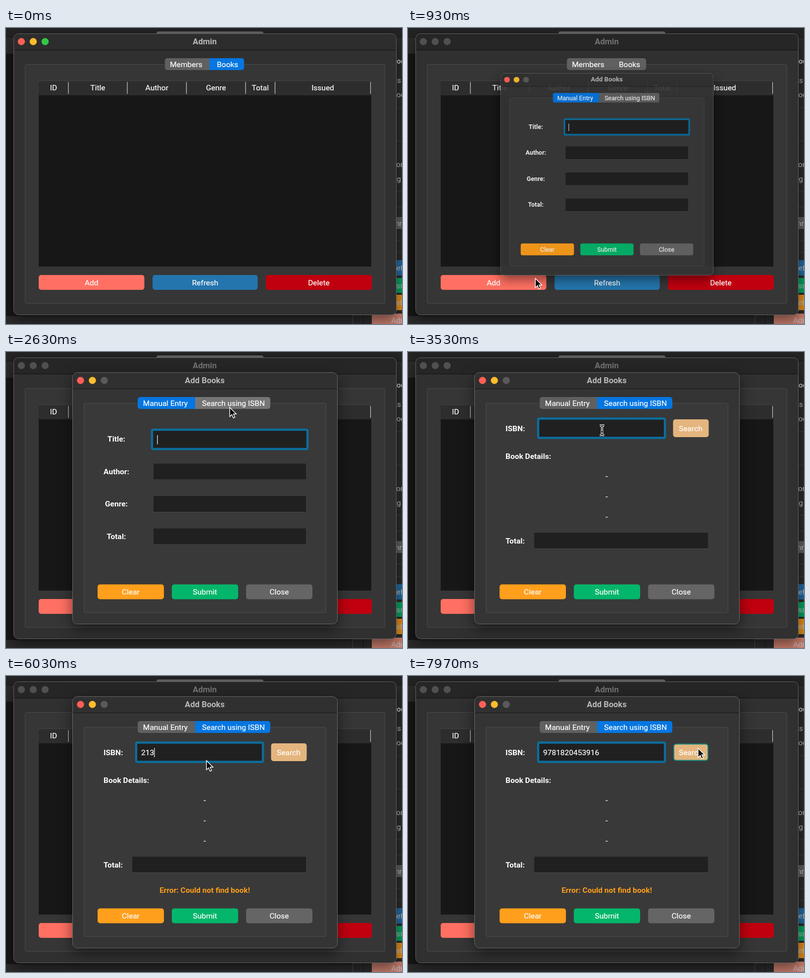
Recreate the animation shown at these times as an HTML page. Size 800 px wide and 598 px high, loop 8 s.

```html
<!DOCTYPE html>
<html lang="en">
<head>
<meta charset="utf-8">
<title>Library admin</title>
<style>
  html, body { margin: 0; width: 100%; height: 100%; overflow: hidden; background: #252525; }
  svg { display: block; width: 100vw; height: 100vh; }
  text { font: 400 15.5px Roboto, sans-serif; fill: #fff; stroke: #fff; stroke-width: .2px; white-space: pre; }
  .b { font-weight: 700; stroke: none; }
  .title { font-weight: 700; font-size: 16.5px; fill: #b8b8b8; stroke: none; }
  .side { fill: #bdbdbd; stroke: none; }
  .err { font-weight: 700; fill: #ff9f1a; stroke: none; }
  .mid { text-anchor: middle; }
  .end { text-anchor: end; }
  .win { filter: drop-shadow(0 10px 14px rgba(0, 0, 0, .5)); }
</style>
</head>
<body>
<svg id="stage" viewBox="0 0 800 598" preserveAspectRatio="none"></svg>
<script>
const LOOP = 8000, STEP = 1000 / 30;
const ISBN = '9781820453916';

// Boxes are given by their edges; text by its vertical centre.
const box = (x1, y1, x2, y2, fill, r = 0, extra = '') =>
  `<rect x="${x1}" y="${y1}" width="${x2 - x1}" height="${y2 - y1}" rx="${r}" fill="${fill}" ${extra}/>`;
const frame = (x1, y1, x2, y2, fill, line, r) =>
  box(x1 + .5, y1 + .5, x2 - .5, y2 - .5, fill, r, `stroke="${line}"`);
const text = (x, y, s, cls = '', extra = '') =>
  `<text x="${x}" y="${y + 5.5}" class="${cls}" ${extra}>${s}</text>`;
const button = (x1, y1, x2, y2, fill, s) =>
  box(x1, y1, x2, y2, fill, 5) + text((x1 + x2) / 2, (y1 + y2) / 2, s, 'mid');
const lights = (x, y, colors, id = '') => colors.map((c, i) =>
  `<circle ${id && `id="${id}${i}"`} cx="${x + i * 24}" cy="${y}" r="7.2" fill="${c}"/>`).join('');
const half = (x1, y1, x2, y2, left, id) => {
  const r = 5, d = left
    ? `M${x2} ${y1}H${x1 + r}a${r} ${r} 0 0 0 -${r} ${r}V${y2 - r}a${r} ${r} 0 0 0 ${r} ${r}H${x2}z`
    : `M${x1} ${y1}H${x2 - r}a${r} ${r} 0 0 1 ${r} ${r}V${y2 - r}a${r} ${r} 0 0 1 -${r} ${r}H${x1}z`;
  return `<path id="${id}" d="${d}"/>`;
};
const field = (x1, y1, x2, y2) =>
  box(x1, y1, x2, y2, '#202020') + box(x1, y2 - 1, x2, y2, '#4b4b4b');
const focused = (x1, y1, x2, y2) =>
  box(x1 + 2, y1 + 2, x2 - 2, y2 - 2, '#202020', 2, 'stroke="#0c6e9c" stroke-width="4.4"');
const caret = (id, x, y) => `<path id="${id}" d="M${x} ${y - 9}v18.5" stroke="#fff" stroke-width="1.2"/>`;

function desktop() {
  let s = box(0, 0, 800, 598, '#2b2b2b') + box(0, 0, 800, 18, '#242424') + box(0, 18, 800, 19, '#151515')
    + box(304, 7, 520, 20, '#686868', 4) + box(0, 52, 700, 582, '#171717')
    + box(700, 580, 701, 598, '#4d4d4d') + box(721, 580, 722, 598, '#171717');
  for (const y of [160, 228, 329, 361, 428, 453]) s += box(722, y, 800, y + 1, '#424242');
  s += text(779, 66, 'Books', 'side b') + text(798, 105, 'Books', 'side end') + text(779, 134, 'Books', 'side')
    + text(788, 275, 'or', 'side') + text(798, 304, 'Log', 'side end')
    + box(739, 382, 820, 406, '#5d5d5d') + text(786, 394, 'nre', 'side');
  const tiles = [[469, 500, '#2069a0', 'Refresh', 779], [505, 535, '#06a05c', 'Issue', 784],
    [539, 570, '#e08c1a', 'Return', 778], [577, 608, '#c97d6c', 'Admin', 778]];
  for (const [y1, y2, c, label, x] of tiles)
    s += box(739, y1, 820, y2, c, 4) + text(x, (y1 + y2) / 2 - (y2 > 600 ? 2 : 0), label, 'side');
  return s;
}

function adminWindow() {
  let s = `<g class="win">${frame(15, 11, 789, 580, '#303030', '#626262', 10)}</g>`
    + `<path id="bar" d="M16 44V22a10 10 0 0 1 10 -10H778a10 10 0 0 1 10 10V44z"/>`
    + box(16, 44, 788, 45, '#111')
    + lights(31, 27.5, ['#ff6158', '#febc2e', '#33c748'], 'light')
    + text(401.5, 27.5, 'Admin', 'title mid', 'id="adminTitle"')
    + frame(38, 73, 766, 557, '#363636', '#4a4a4a', 3)
    + half(321, 61, 411, 85, true, 'tabMembers') + half(411, 61, 481, 85, false, 'tabBooks')
    + text(364, 73.5, 'Members', 'mid') + text(447.5, 73.5, 'Books', 'mid')
    + box(66, 106, 738, 482, '#171717') + box(66, 106, 738, 136, '#2d2d2d')
    + box(66, 106, 738, 107, '#434343');
  const cols = [['ID', 66, 126], ['Title', 126, 245], ['Author', 245, 364.5],
    ['Genre', 364.5, 484], ['Total', 484, 543.5], ['Issued', 543.5, 736.5]];
  for (const [name, a, b] of cols)
    s += text((a + b) / 2, 120.5, name, 'mid') + box(b - .6, 109, b + .6, 133, '#d0d0d0');
  return s + button(66, 499, 279.5, 529, '#ff7062', 'Add')
    + button(296, 499, 508.5, 529, '#2475ad', 'Refresh')
    + button(525, 499, 739, 529, '#c1000f', 'Delete');
}

function manualPane() {
  let s = focused(293, 155, 611, 198) + caret('titleCaret', 306, 177);
  ['Title:', 'Author:', 'Genre:', 'Total:'].forEach((label, i) => {
    const y = 175.5 + i * 65.5;
    s += text(223, y, label, 'b mid');
    if (i) s += field(298, y - 15.5, 606, y + 17.5);
  });
  return s;
}

function searchPane() {
  let s = text(197, 154, 'ISBN:', 'b') + focused(261, 132.5, 521, 175.5)
    + box(272, 145, 300, 165, '#3f638b', 0, 'id="selection"')
    + text(273, 154, '', '', 'id="isbn"') + caret('isbnCaret', 0, 154.5)
    + box(535.5, 136, 607.5, 172, '#e4b57e', 5, 'id="search"') + text(571, 154, 'Search', 'mid')
    + text(197, 210, 'Book Details:', 'b');
  for (const y of [250.5, 291.5, 332]) s += text(401.5, y, '-', 'mid');
  return s + text(197, 381.5, 'Total:', 'b') + field(255, 365, 606, 398)
    + text(401.5, 432, 'Error: Could not find book!', 'err mid', 'id="error"');
}

function dialogWindow() {
  return frame(134, 41, 670, 550, '#343434', '#686868', 10)
    + `<path d="M135 74V52a10 10 0 0 1 10 -10H659a10 10 0 0 1 10 10V74z" fill="#303030"/>`
    + box(135, 74, 669, 75, '#151515')
    + lights(150.5, 57.5, ['#ff5f57', '#febc2e', '#5a5a5a'])
    + text(401.5, 57, 'Add Books', 'title mid')
    + frame(157, 103, 647, 527, '#393939', '#4d4d4d', 3)
    + half(266, 91, 382, 115, true, 'tabManual') + half(382, 91, 534, 115, false, 'tabSearch')
    + text(322, 103.5, 'Manual Entry', 'mid') + text(459.5, 103.5, 'Search using ISBN', 'mid')
    + `<g id="manual">${manualPane()}</g><g id="byIsbn">${searchPane()}</g>`
    + button(185, 469.5, 319, 499.5, '#ff9f1c', 'Clear')
    + button(335, 469.5, 469, 499.5, '#04b66b', 'Submit')
    + button(485, 469.5, 619, 499.5, '#656565', 'Close');
}

const beam = 'M-4.5 -10Q0 -10 0 -6.5Q0 -10 4.5 -10M0 -7V7M-4.5 10Q0 10 0 6.5Q0 10 4.5 10M-2.5 3H2.5';
document.getElementById('stage').innerHTML = desktop() + adminWindow()
  + `<g id="dialog" class="win">${dialogWindow()}</g>`
  + `<path id="arrow" d="M0 0V18.5L4.3 14.5L7.3 21.4L10.4 20L7.5 13.3H13.2Z" fill="#000" stroke="#fff" stroke-width="1.4"/>`
  + `<g id="beam" fill="none"><path d="${beam}" stroke="#fff" stroke-width="4"/><path d="${beam}" stroke="#111" stroke-width="1.5"/></g>`;

const el = {};
document.querySelectorAll('[id]').forEach(n => el[n.id] = n);
const show = (n, on) => n.setAttribute('visibility', on ? 'inherit' : 'hidden');
const fill = (n, c) => n.setAttribute('fill', c);

// Pointer stops: time, x, y.
const path = [[0, 803, 592], [33, 798, 590], [600, 256, 509], [900, 256, 509], [1400, 352, 268],
  [1600, 352, 268], [1800, 360, 250], [1900, 360, 250], [2400, 452, 112], [2800, 452, 112],
  [3400, 392, 158], [4033, 392, 158], [4300, 482, 109], [4567, 482, 109], [4867, 537, 164],
  [5133, 537, 164], [5333, 463, 174], [5567, 463, 174], [6033, 405, 171], [6330, 394, 158],
  [7530, 394, 158], [7900, 586, 146], [8000, 586, 146]];

function pointer(t) {
  let i = 1;
  while (path[i][0] < t && i < path.length - 1) i++;
  const [t0, x0, y0] = path[i - 1], [t1, x1, y1] = path[i];
  const p = Math.min(1, (t - t0) / (t1 - t0)), e = p * p * (3 - 2 * p);
  return [x0 + (x1 - x0) * e, y0 + (y1 - y0) * e];
}

function overField(x, y, searching) {
  if (searching) return x > 265 && x < 517 && y > 137 && y < 169;
  return x > 298 && x < 606 && [175.5, 241, 306.5, 372].some(c => Math.abs(y - c - 1) < 17);
}

function typed(t) {
  if (t >= 7025) return ISBN;
  return '213'.slice(0, [3700, 3830, 3965].filter(k => t >= k).length);
}

function draw(ms) {
  const t = Math.floor((ms + 4) / STEP) * STEP;
  const open = t >= 825, searching = t >= 2790, GREY = '#606060', BLUE = '#0576e1';

  fill(el.bar, open ? '#262626' : '#2d2d2d');
  ['#ff6158', '#febc2e', '#33c748'].forEach((c, i) => fill(el['light' + i], open ? '#505050' : c));
  el.adminTitle.style.fill = open ? '#727272' : '#b8b8b8';
  fill(el.tabMembers, GREY);
  fill(el.tabBooks, open ? GREY : BLUE);

  const p = Math.min(1, Math.max(0, (t - 800) / 220)), s = .5 + .5 * p;
  show(el.dialog, open);
  el.dialog.setAttribute('transform', `translate(401.7 295.7) scale(${s}) translate(-401.7 -295.7)`);
  el.dialog.setAttribute('opacity', Math.min(1, .5 + .7 * p));
  fill(el.tabManual, searching ? GREY : BLUE);
  fill(el.tabSearch, searching ? BLUE : t >= 2590 ? '#757575' : GREY);
  show(el.manual, open && !searching);
  show(el.byIsbn, searching);

  el.isbn.textContent = typed(t);
  const selected = t >= 6495 && t < 7025;
  show(el.selection, selected);
  const blinkOff = t < 3630 || (t >= 5690 && t < 5990) || t >= 7525;
  show(el.isbnCaret, searching && !selected && !blinkOff);
  el.isbnCaret.setAttribute('transform', `translate(${273.6 + el.isbn.getComputedTextLength()} 0)`);
  show(el.error, t >= 5125);

  const pressed = (t >= 4890 && t < 5125) || t >= 7925, inset = pressed ? 1.5 : 0;
  const b = { x: 535.5 + inset, y: 136 + inset, width: 72 - 2 * inset, height: 36 - 2 * inset,
    stroke: pressed ? '#148c80' : 'none', 'stroke-width': 2 };
  for (const k in b) el.search.setAttribute(k, b[k]);

  const [x, y] = pointer(t), isBeam = open && overField(x, y, searching);
  const hidden = t < 20 || (t >= 3690 && t < 4030);
  show(el.arrow, !hidden && !isBeam);
  show(el.beam, !hidden && isBeam);
  for (const n of [el.arrow, el.beam]) n.setAttribute('transform', `translate(${x} ${y})`);
}

const start = performance.now();
function tick() {
  draw((performance.now() - start) % LOOP);
  requestAnimationFrame(tick);
}
tick();
</script>
</body>
</html>
```
